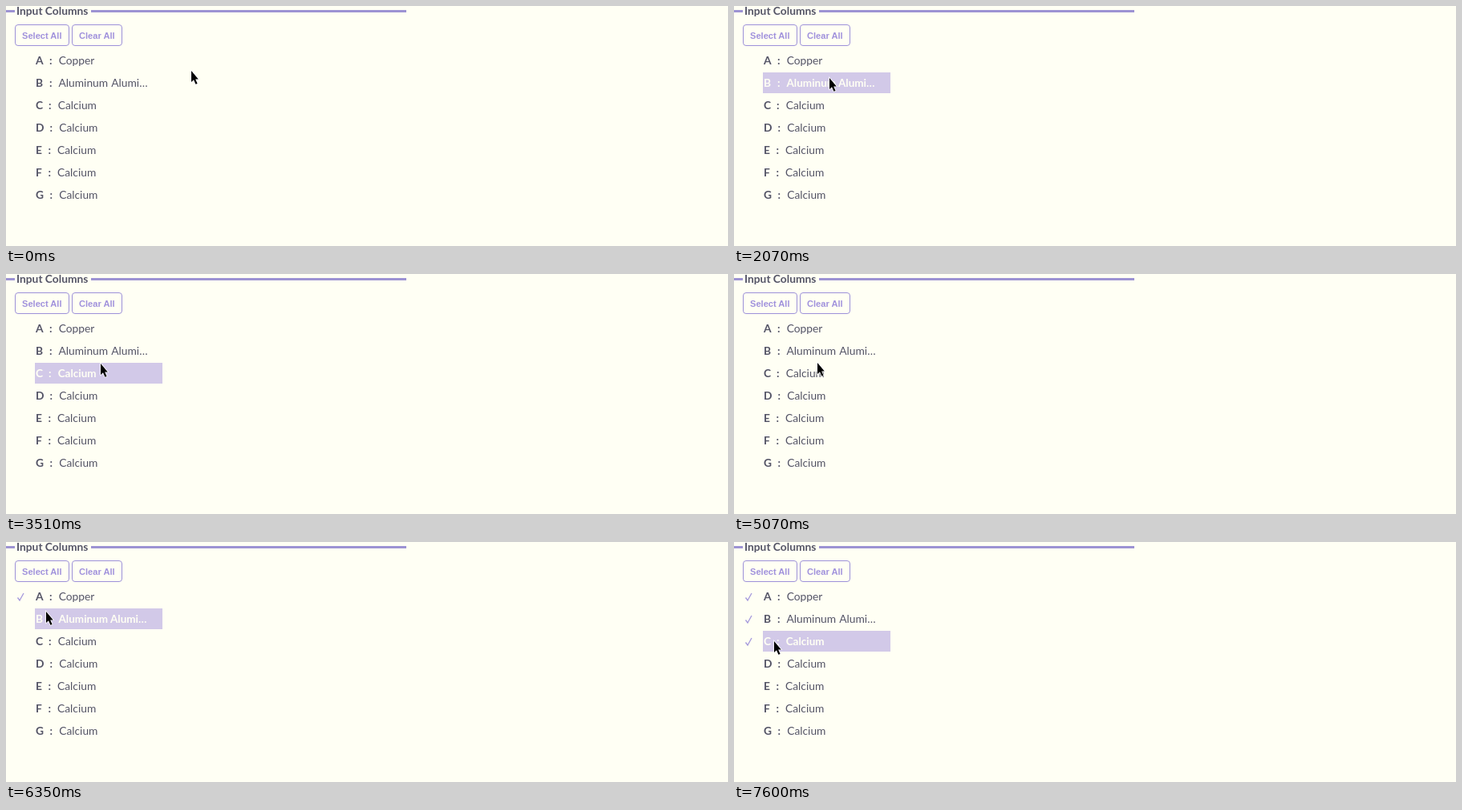
Write an HTML page that moves like this. It is 900x300 px and loops after 8000 ms.

```html
<!DOCTYPE html>
<html lang="en">
<head>
<meta charset="utf-8">
<title>Input Columns</title>
<style>
  html, body { margin: 0; width: 100%; height: 100%; overflow: hidden; background: #fffff4; }
  svg { display: block; }
  text { font: 13.8px Lato, Carlito, sans-serif; fill: #545466; white-space: pre; }
  .name { word-spacing: 1px; }
  .bold, .on text { font-weight: bold; }
  .on text { fill: #fffff4; }
  .on .name { font-size: 13.5px; word-spacing: 0; }
  .bar { fill: #d2c9e8; visibility: hidden; }
  .on .bar { visibility: visible; }
  .tick { fill: none; stroke: #a599dc; stroke-width: 1.3; }
  .button rect { fill: none; stroke: #9d91d9; }
  .button text { font: bold 11.1px "Liberation Sans", Arial, sans-serif; fill: #a091dc; }
  #tip rect { fill: #fff; stroke: #767676; }
  #tip text { font: 11.2px "Open Sans", sans-serif; fill: #575757; }
</style>
</head>
<body>
<svg width="900" height="300" viewBox="0 0 900 300">
  <path d="M0 6.5H11M106 6.5H499" stroke="#9d93d3" stroke-width="3"/>
  <text class="bold" x="13" y="11">Input Columns</text>
  <g class="button">
    <rect x="11.5" y="23.5" width="67" height="26" rx="3.5"/>
    <text x="20" y="41">Select All</text>
    <rect x="82.5" y="23.5" width="62" height="26" rx="3.5"/>
    <text x="91" y="41">Clear All</text>
  </g>
  <g id="rows"></g>
  <g id="tip">
    <rect x=".5" y=".5" height="56"/>
    <text x="9" y="17"></text><text x="9" y="33"></text><text x="9" y="49"></text>
  </g>
  <path id="cursor" d="M1 1V15L4 12.2L6.4 17.8L8.6 16.9L6.2 11.4H9.8Z"
        stroke="#fff" stroke-width="1.4" paint-order="stroke"/>
  <circle id="click" r="12" fill="#ff0" fill-opacity=".47"/>
</svg>
<script>
const LOOP = 8000;
const $ = id => document.getElementById(id);

const names = ['Copper', 'Aluminum Alumi…', ...Array(5).fill('Calcium')];
const nameX = [65.7, 65.5, 64.7, 66.2, 64, 64, 66.2];
const tickAt = [5960, 6780, 7600];

// Pointer moves: start, end, steps, target x, target y, ease-out power
const start = [230, 80];
const moves = [
  [420, 820, 7, 129, 70, 1.5],
  [1620, 2070, 8, 118, 89, 1.5],
  [3130, 3720, 10, 116, 119, 1.1],
  [5070, 5660, 10, 47, 70, 2],
  [6210, 6550, 6, 50, 95, 1.5],
  [6960, 7220, 5, 49, 123, 1.5]
];
// Tooltips: from, to, row, width, full name
const tips = [
  [1070, 1620, 0, 94, 'Copper'],
  [2520, 3130, 1, 129, 'Aluminum Aluminum'],
  [4080, 5070, 2, 93, 'Calcium']
];
const clicks = [[5840, 5960], [6650, 6780], [7470, 7600]];

$('rows').innerHTML = names.map((name, i) => `
  <g transform="translate(0 ${55 + 28 * i})">
    <rect class="bar" x="36" width="159" height="26"/>
    <path class="tick" d="M14.5 14.5L17 18L22 9"/>
    <text class="bold" x="37" y="18">${'ABCDEFG'[i]}</text>
    <text class="bold" x="${nameX[i] - 11.6}" y="18">:</text>
    <text class="name" x="${nameX[i]}" y="18">${name}</text>
  </g>`).join('');
const rows = [...$('rows').children];
const ticks = rows.map(row => row.querySelector('.tick'));

const show = (el, on) => el.setAttribute('visibility', on ? 'visible' : 'hidden');
const place = (el, x, y) => el.setAttribute('transform', `translate(${x} ${y})`);
const active = (list, t) => list.find(([from, to]) => t >= from && t < to);

function pointer(t) {
  let [x, y] = start;
  for (const [from, to, steps, tx, ty, power] of moves) {
    if (t < from) break;
    const step = Math.min(steps, 1 + Math.floor((t - from) / (to - from) * (steps - 1) + 0.25));
    const p = 1 - (1 - step / steps) ** power;
    x += (tx - x) * p;
    y += (ty - y) * p;
  }
  return [Math.round(x), Math.round(y)];
}

function draw(now) {
  const t = now % LOOP;
  const [x, y] = pointer(t);
  place($('cursor'), x, y);

  rows.forEach((row, i) => {
    const top = 55 + 28 * i;
    row.classList.toggle('on', x >= 36 && x < 195 && y >= top && y < top + 26);
    show(ticks[i], t >= tickAt[i]);
  });

  const tip = active(tips, t);
  show($('tip'), tip);
  if (tip) {
    const [, , row, width, name] = tip;
    const [box, ...lines] = $('tip').children;
    place($('tip'), x + 10, y + 15);
    box.setAttribute('width', width - 1);
    [`Column: ${'ABC'[row]}`, name, 'Type: Numeric'].forEach((s, i) => lines[i].textContent = s);
  }

  show($('click'), active(clicks, t));
  place($('click'), x, y);
}

const began = performance.now();
function frame() {
  draw(performance.now() - began);
  requestAnimationFrame(frame);
}
frame();
</script>
</body>
</html>
```
